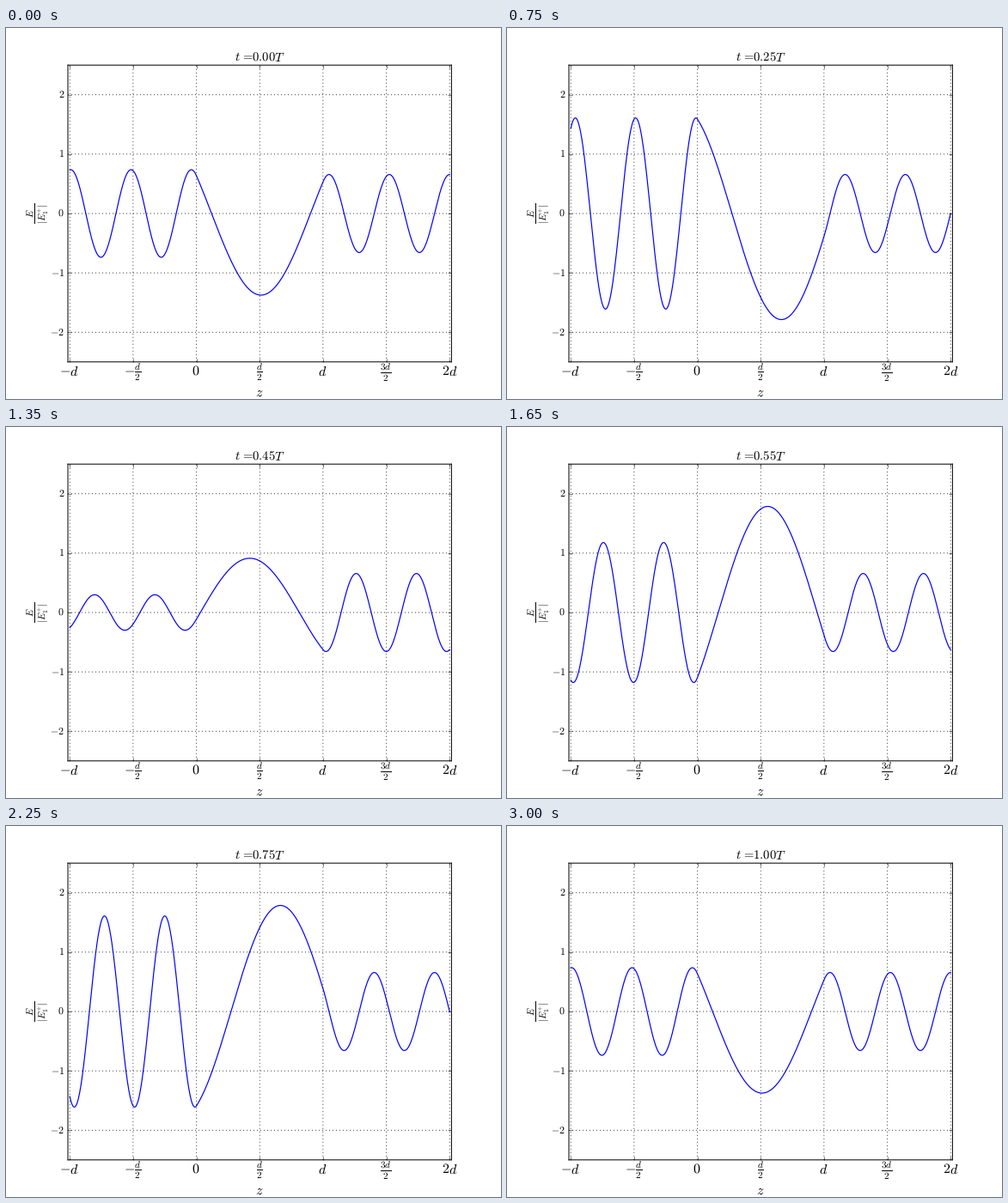
Write a matplotlib script that moves like this. It is 576 px wide and 432 px high and loops after 3.15 s.

```python
import numpy as np
import matplotlib.pyplot as plt
from matplotlib.animation import FuncAnimation

W, H, DPI = 576, 432, 72
FRAMES, STEP_MS = 21, 150

# Wave numbers outside and inside the slab 0 < z < d, with d = 1
K1 = 2 * np.pi * 2.1
K2 = 2 * np.pi * 0.64
RATIO = K1 / K2
TRANS = 1 / np.sqrt(1 + 0.25 * (RATIO - 1 / RATIO) ** 2 * np.sin(K2) ** 2)

plt.rcParams.update({
    "mathtext.fontset": "cm",
    "text.hinting": "no_hinting",
    "lines.scale_dashes": False,
    "xtick.direction": "in",
    "ytick.direction": "in",
})


def slab_field(z):
    """Complex field with E and dE/dz continuous at both faces."""
    out = TRANS * np.exp(1j * K1 * (z - 2))
    e_d = TRANS * np.exp(-1j * K1)
    mid = e_d * (np.cos(K2 * (z - 1)) + 1j * RATIO * np.sin(K2 * (z - 1)))
    e_0 = e_d * (np.cos(K2) - 1j * RATIO * np.sin(K2))
    slope_0 = e_d * (np.sin(K2) / RATIO + 1j * np.cos(K2))
    left = e_0 * np.cos(K1 * z) + slope_0 * np.sin(K1 * z)
    return np.where(z < 0, left, np.where(z < 1, mid, out))


fig = plt.figure(figsize=(W / DPI, H / DPI), dpi=DPI, facecolor="white")
ax = fig.add_axes([0.125, 0.1, 0.775, 0.8])
ax.set_xlim(-1.015, 2.015)
ax.set_ylim(-2.5, 2.5)
ax.set_xticks(np.arange(-1, 2.1, 0.5))
ax.set_yticks(range(-2, 3))
ax.tick_params(length=4, width=0.5, top=True, right=True,
               labelbottom=False, labelleft=False)
ax.grid(True, color="black", lw=0.75, ls=(0, (1, 3)), snap=False)
ax.set_axisbelow(False)
for spine in ax.spines.values():
    spine.set(linewidth=1, snap=False)


def label(x, y, text, size, **kw):
    """Place text at pixel (x, y), measured from the top left."""
    kw = {"ha": "center", "va": "baseline", **kw}
    return fig.text(x / W, 1 - y / H, text, fontsize=size, **kw)


def to_px(x, y):
    px, py = ax.transData.transform((x, y))
    return px, H - py


names = ["-d", r"-\frac{d}{2}", "0", r"\frac{d}{2}", "d", r"\frac{3d}{2}", "2d"]
for z, name in zip(ax.get_xticks(), names):
    label(to_px(z, 0)[0] - 0.5, 405, f"${name}$", 16)
for v in range(-2, 3):
    label(68, to_px(0, v)[1] + 3.5, f"${v}$", 12, ha="right")
label(295.2, 429, "$z$", 16)
label(36.5, 216, r"$\frac{E}{|E_1^{+}|}$", 16, va="center", rotation=90)
title = label(295.7, 38.2, "", 14.7)

z = np.linspace(-1, 2, 1000)
field = slab_field(z)
wave, = ax.plot(z, field.real, color="blue", lw=1.2)


def update(i):
    t = i / (FRAMES - 1)
    wave.set_ydata((field * np.exp(-2j * np.pi * t)).real)
    title.set_text(rf"$t\hspace{{0.1}}=\hspace{{-0.2}}\mathbf{{{t:.2f}}}T$")
    return wave, title


anim = FuncAnimation(fig, update, frames=FRAMES, interval=STEP_MS,
                     repeat=True, repeat_delay=0, blit=False)
plt.show()
```
